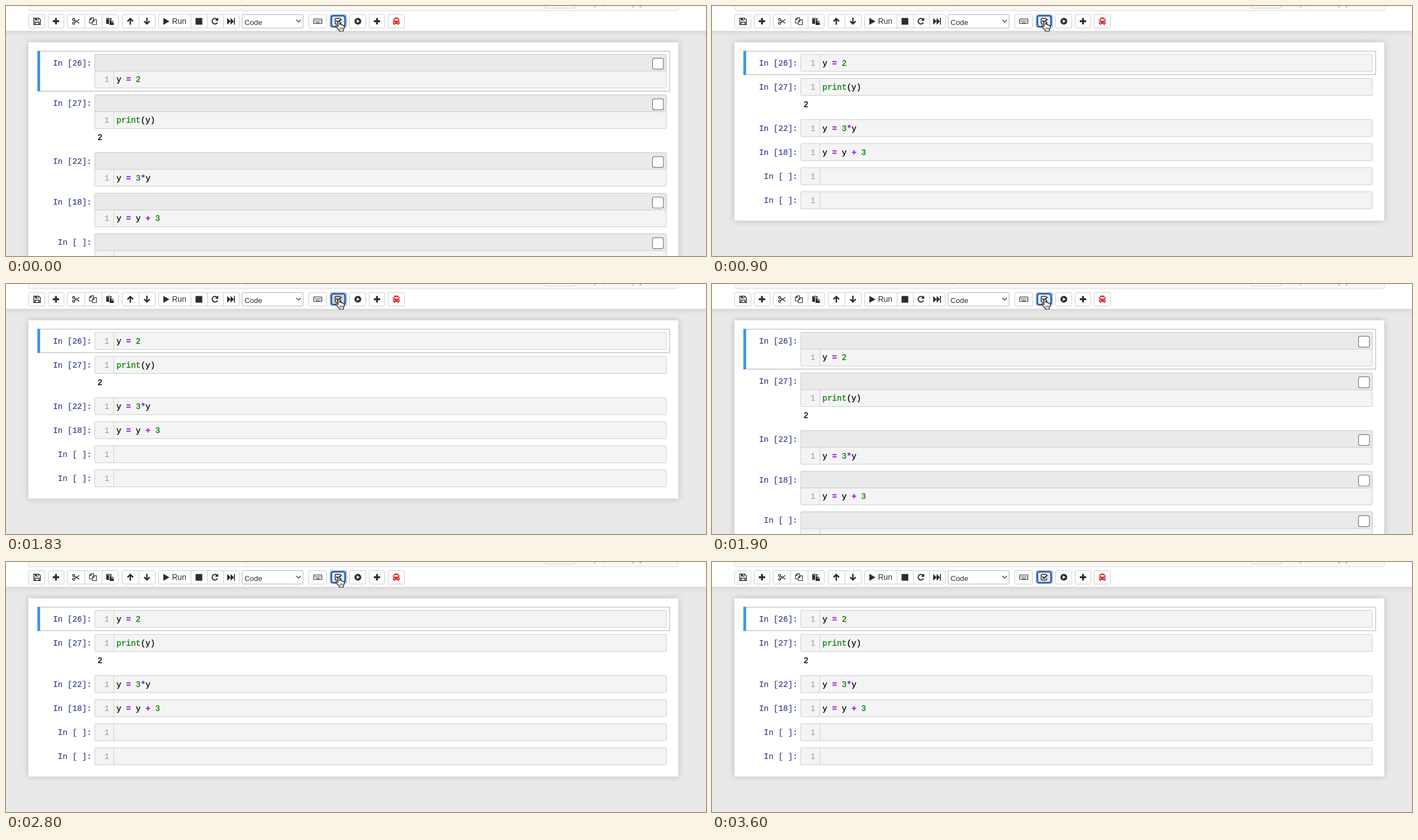
Animation, 1250 px wide and 448 px high, one loop 3.73 s. Source, as an HTML page:

```html
<!DOCTYPE html>
<html lang="en">
<head>
<meta charset="utf-8">
<title>Notebook cell toolbar</title>
<style>
html, body { margin: 0; width: 100%; height: 100%; overflow: hidden; background: #e9e9e9; }
svg { display: block; width: 1250px; height: 448px; }
text { white-space: pre; }
.code text, .prompt { font: 14.4px "Liberation Mono", "Courier New", monospace; }
.code text { stroke: currentColor; stroke-width: .3px; }
.prompt { fill: #303f8f; stroke: #303f8f; stroke-width: .2px; text-anchor: end; }
.ui { font-family: "Liberation Sans", Arial, sans-serif; fill: #2d2d2d; }
.num { fill: #008000; stroke: #008000; }
.op { fill: #9a1fe0; stroke: #9a1fe0; font-weight: bold; }
.code .line { fill: #999; stroke: none; text-anchor: middle; }
.box { fill: #fff; stroke: #ccc; }
.page { fill: #fff; filter: drop-shadow(0 0 6px rgba(87, 87, 87, .32)); }
.ink { fill: #2d2d2d; }
.pen { fill: none; stroke: #2d2d2d; stroke-width: 1.5; }
#open, #closed, #hand, #check { animation: 3730ms step-end infinite; }
#open { animation-name: open; }
#closed { animation-name: closed; }
#hand { animation-name: hand; }
#check { animation-name: press; }
@keyframes open {
  0%, 50.93% { visibility: visible; }
  24.12%, 75.06%, 100% { visibility: hidden; }
}
@keyframes closed {
  0%, 50.93% { visibility: hidden; }
  24.12%, 75.06%, 100% { visibility: visible; }
}
@keyframes hand {
  0% { visibility: visible; }
  94.63%, 100% { visibility: hidden; }
}
@keyframes press {
  0%, 24.12%, 50.93%, 75.06%, 100% { fill: #e4e8ec; }
  20.64%, 48.25%, 58.17% { fill: #cfd1d4; }
}
</style>
</head>
<body>
<svg viewBox="0 0 1250 448">
  <defs>
    <linearGradient id="shade" x2="0" y2="1">
      <stop stop-color="#d6d6d6"/>
      <stop offset=".4" stop-color="#e2e2e2"/>
      <stop offset="1" stop-color="#e9e9e9"/>
    </linearGradient>
  </defs>
  <rect width="1250" height="448" fill="#e9e9e9"/>
  <g id="open"></g>
  <g id="closed"></g>

  <rect y="44" width="1250" height="13" fill="url(#shade)"/>
  <rect width="1250" height="44.5" fill="#fff"/>
  <path d="M40.5-2V6.500q0 2 2 2H1198q2.500 0 2.500-2V-2z" fill="#f8f8f8" stroke="#dedede"/>
  <path d="M963-2V2q0 1.500 1.500 1.500H1014q1.500 0 1.500-1.500V-2z" fill="#fff" stroke="#ccc"/>
  <path d="M1051 0v2.500M1068 0v1M1121 0q0 2-2.500 2M1134 0q0 2-2.500 2M431 0v1" fill="none" stroke="#777"/>

  <g id="buttons"></g>
  <rect x="421.500" y="15.500" width="109" height="24" rx="1.500" fill="#fff" stroke="#b5b5b5"/>
  <text class="ui" x="426" y="33.500" font-size="13.200">Code</text>
  <path d="M518.500 25l4 4 4-4" class="pen" style="stroke-width:1.200"/>

  <!-- save -->
  <g transform="translate(49 21)">
    <path class="pen" d="M.7.7H9.500L12.300 3.500V12.300H.7z"/>
    <path class="ink" d="M3 0H9V5H3z"/>
    <path d="M6 1.300H8V3.700H6z" fill="#fff"/>
    <path class="pen" d="M3 12V8H10V12" stroke-width="1.200"/>
  </g>
  <path class="ink" d="M87.500 21.500h3.400v4h4v3.400h-4v4h-3.400v-4h-4v-3.400h4z"/>
  <!-- cut -->
  <g transform="translate(118 21)">
    <g class="pen" style="stroke-width:1.400">
      <circle cx="2.700" cy="3.200" r="1.900"/>
      <circle cx="2.700" cy="9.800" r="1.900"/>
      <path d="M4.500 4.300L13 10M4.500 8.700L13 3"/>
    </g>
  </g>
  <!-- copy -->
  <g transform="translate(148.500 20.500)" class="pen" style="stroke-width:1.200">
    <path d="M5.500 10H.6V3.500L3.500.6H8V4M3.600.6V3.700H.6"/>
    <path d="M5.600 7.200L8.500 4.200H13V13H5.600zM8.600 4.200V7.300H5.600"/>
  </g>
  <!-- paste -->
  <g transform="translate(179 20.500)">
    <path class="ink" d="M0 1.300H3Q4.500-.8 6 1.300H9.500V4H5V11.500H0z"/>
    <path class="ink" d="M6 5H10.500L13.500 8V13.500H6z"/>
    <path d="M2.500 2.500H7M10 5.500V8.500H13.500" stroke="#fff" fill="none"/>
  </g>
  <path id="arrow" d="M222 33.500V22.500M217 27.500l5-5 5 5" class="pen" style="stroke-width:2.500"/>
  <use href="#arrow" transform="rotate(180 236.800 27.300)"/>

  <path class="ink" d="M281 21.300L291.800 27.500 281 33.700z"/>
  <text class="ui" x="296.500" y="32.300" font-size="13.800">Run</text>
  <path class="ink" d="M338.500 21.500h12v12h-12z"/>
  <path class="pen" d="M377 24.100A5 5 0 1 0 377.600 29.500" style="stroke-width:2"/>
  <path class="ink" d="M379 20.700V26.500H373.200z"/>
  <path class="ink" d="M395 21.500l6 6-6 6zM401 21.500l6 6-6 6zM407 21.500h1.700v12H407z"/>

  <!-- keyboard -->
  <rect x="549.500" y="23" width="14.500" height="8.500" rx="1" class="pen" style="stroke-width:1.200"/>
  <path class="pen" d="M551.500 25.500h11M551.500 27.500h11" stroke-dasharray="1.300 .8" style="stroke-width:1.200"/>
  <path class="pen" d="M553.500 29.700h6.500" style="stroke-width:1.200"/>

  <!-- active toggle -->
  <rect x="578.500" y="15" width="30" height="24" rx="3" fill="#c9d6e6" stroke="#a9bdd5"/>
  <rect id="check" x="581" y="17.500" width="24.500" height="19.500" rx="3.500" stroke="#1557ad" stroke-width="2.600"/>
  <path class="pen" d="M597 22.300H589.500Q587.800 22.300 587.800 24V31Q587.800 32.500 589.500 32.500H596Q597.800 32.500 597.800 31V29"/>
  <path class="pen" d="M590 26.200l3 3 6-6" style="stroke-width:2.300"/>

  <circle class="ink" cx="628.300" cy="27.300" r="6.100"/>
  <path d="M626.300 24.200L631.700 27.300 626.300 30.500z" fill="#fff"/>
  <path class="ink" d="M660.800 21.500h3.400v4h4v3.400h-4v4h-3.400v-4h-4v-3.400h4z"/>

  <!-- bus -->
  <g transform="translate(690.500 20.500)" fill="#dc2d2d">
    <path d="M1.500 7L2.500 1.500Q3 0 6.500 0T10.500 1.500L11.500 7Q12.500 7.500 12.500 9V11.500H11V13.500H8.800V11.500H4.200V13.500H2V11.500H.5V9Q.5 7.500 1.500 7z"/>
    <path d="M3.300 5.800L4 2.700H9L9.700 5.800z" fill="#fff"/>
    <circle cx="3" cy="8.900" r="1" fill="#fff"/>
    <circle cx="10" cy="8.900" r="1" fill="#fff"/>
    <path d="M0 3H1V6H0zM12 3H13V6H12z"/>
  </g>

  <g id="hand" stroke="#111" stroke-width="1.200" stroke-linejoin="round">
    <path fill="#fff" d="M593 37V28.500Q593 26.800 594.500 26.800T596 28.500V33.200Q596.500 32 598 32.500T599 34Q600.500 33 601.500 34.800Q604 34 604 37V39.500L602.500 42.500V45H595V43L590.500 38.500Q588.300 36.200 589.500 35.300T593 37z"/>
    <path fill="none" stroke-width=".9" d="M596.700 38.500v3.500M599 38.500v3.500M601.200 38.500v3.500"/>
  </g>
</svg>
<script>
const $ = id => document.getElementById(id);
const rect = (x, y, w, h, attrs) => `<rect x="${x}" y="${y}" width="${w}" height="${h}" ${attrs}/>`;

// Each group: left edge, right edge, inner dividers
const groups = [[40, 70], [75, 104], [109, 201, 140, 171], [207, 267, 237],
  [272, 417, 330, 359, 388], [540, 573], [613, 643], [648, 677], [682, 712]];
$("buttons").innerHTML = groups.map(([a, b, ...cuts]) =>
  rect(a + .5, 15.5, b - a - 1, 24, 'rx="2" class="box"') +
  cuts.map(x => `<path d="M${x + .5} 15.5v24" stroke="#ccc"/>`).join("")).join("");

const cells = [["26", "y = 2"], ["27", "print(y)"], ["22", "y = 3*y"],
  ["18", "y = y + 3"], [" ", ""], [" ", ""]];

const paint = src => src.replace(/print|\d+|[=*+]/g, s =>
  `<tspan class="${/[=*+]/.test(s) ? "op" : "num"}">${s}</tspan>`);

function cell([label, src], y, open) {
  const bar = open ? 29.7 : 0;
  const mid = y + bar;
  let s = rect(158.5, y, 1020.5, 30.5 + bar, 'rx="1.5" fill="#f4f4f4" stroke="#cbcbcb"');
  if (open) {
    s += rect(158.5, y, 1020.5, 30, 'rx="1" fill="#eaeaea" stroke="#cbcbcb"') +
      rect(1154.5, y + 7, 19.5, 19.5, 'rx="3" fill="#fff" stroke="#777" stroke-width="1.2"');
  }
  return s + `<path d="M192.5 ${mid + .5}v29.5" stroke="#cfcfcf"/>
    <text class="prompt" x="153" y="${y + 20}">In [${label}]:</text>
    <g class="code"><text class="line" x="180" y="${mid + 20}">1</text>
    <text x="197.3" y="${mid + 20}" color="#000">${paint(src)}</text></g>`;
}

function notebook(open) {
  const step = open ? 72.7 : 43.1;
  const extra = 30.7;
  let s = rect(40, 65, 1160.5, open ? 500 : 319.5, 'class="page"') +
    rect(56.5, 81, 1128.5, open ? 71.5 : 42, 'fill="#fff" stroke="#ababab"') +
    rect(56, 80.5, 5, open ? 72.5 : 43, 'fill="#3f97ee"');
  cells.forEach((c, i) => s += cell(c, 86.7 + i * step + (i > 1 ? extra : 0), open));
  return s + `<g class="code"><text x="163.5" y="${open ? 240 : 180.5}" color="#000">2</text></g>`;
}

$("open").innerHTML = notebook(true);
$("closed").innerHTML = notebook(false);
</script>
</body>
</html>
```
